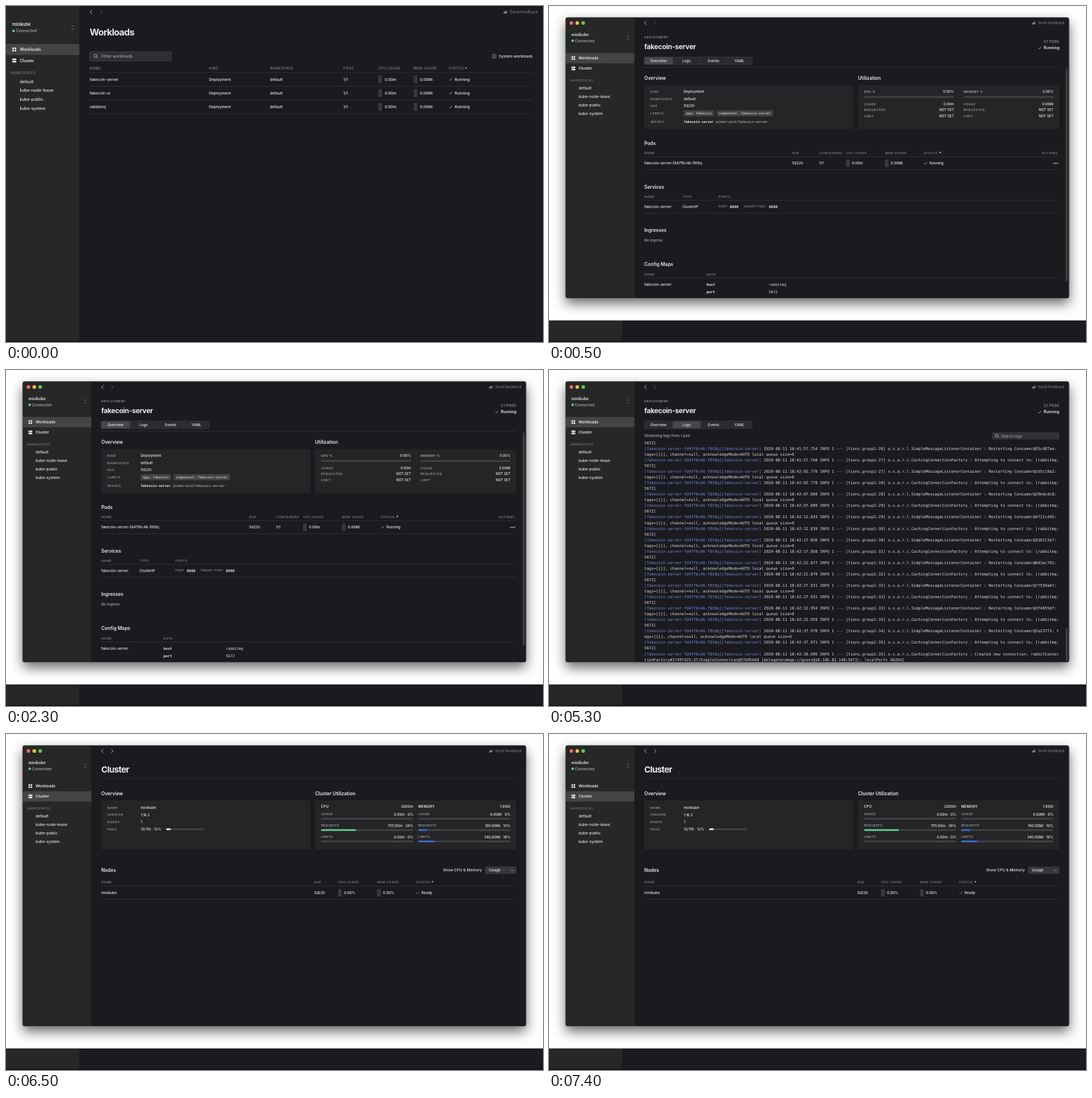
An HTML page for the animation above (8 s loop, 947 by 592 pixels).

```html
<!DOCTYPE html>
<html lang="en">
<head>
<meta charset="utf-8">
<title>Cluster dashboard</title>
<style>
  html, body { margin: 0; width: 100%; height: 100%; overflow: hidden; background: #1b1a1e; }
  svg { display: block; width: 947px; height: 592px; }
  text { font-family: Inter, Roboto, sans-serif; white-space: pre; }
  .mono { font-family: "DejaVu Sans Mono", "Liberation Mono", monospace; }
</style>
</head>
<body>
<svg id="stage" viewBox="0 0 947 592"></svg>
<script>
const WHITE = '#e9e9ea', SOFT = '#c9c9cb', GRAY = '#8b8b8e', DIM = '#626266';
const LINE = '#343438', PANEL = '#252528', TRACK = '#434347', GREEN = '#5fcb8b', BLUE = '#336fd4';
const RIGHT = 900, LEFT = 168;

// y is the middle of the capital letters
const text = (x, y, str, { size = 6.3, weight = 500, fill = WHITE, gap = 0, anchor = 'start', mono = false } = {}) =>
  `<text x="${x}" y="${(y + size * .36).toFixed(2)}" font-size="${size}" font-weight="${weight}" fill="${fill}"` +
  ` letter-spacing="${gap}" text-anchor="${anchor}"${mono ? ' class="mono"' : ''}>${str.replace(/&/g, '&amp;')}</text>`;
const end = (x, y, str, style = {}) => text(x, y, str, { ...style, anchor: 'end' });
const mid = (x, y, str, style = {}) => text(x, y, str, { ...style, anchor: 'middle' });
const mono = (x, y, str, style = {}) => text(x, y, str, { size: 5.85, weight: 400, ...style, mono: true });
const label = (x, y, str, style = {}) => text(x, y, str, { size: 5.45, fill: GRAY, gap: .6, ...style });
const heading = (x, y, str) => text(x, y, str, { size: 8.3, weight: 600 });
const rect = (x, y, w, h, fill, r = 0, extra = '') =>
  `<rect x="${x}" y="${y}" width="${w}" height="${h}" rx="${r}" fill="${fill}" ${extra}/>`;
const dot = (x, y, r, fill) => `<circle cx="${x}" cy="${y}" r="${r}" fill="${fill}"/>`;
const stroke = (d, color, width = 1) => `<path d="${d}" fill="none" stroke="${color}" stroke-width="${width}"/>`;
const rule = (y, x1 = LEFT, x2 = RIGHT) => stroke(`M${x1} ${y}H${x2}`, LINE, .9);
const check = (x, y, color = SOFT) => stroke(`M${x - 2.4} ${y + .3}l1.6 1.7 3.4 -4`, color, .8);
const caret = (x, y) => `<path d="M${x - 1.7} ${y - 1.4}h3.4l-1.7 2.8z" fill="${SOFT}"/>`;
const lens = (x, y) => stroke(`M${x + 1.4} ${y + 1.4}l2.4 2.4`, SOFT, .9) +
  `<circle cx="${x - .5}" cy="${y - .5}" r="2.6" fill="none" stroke="${SOFT}" stroke-width=".9"/>`;
const gauge = (x, y, h = 13) => rect(x, y - h / 2, 6.3, h, '#39393c', .6);
const bar = (x, y, w, value = 0, color = GREEN) =>
  rect(x, y - 1.5, w, 3, TRACK, 1.5) + (value ? rect(x, y - 1.5, value, 3, color, 1.5) : '');
const headers = (y, cols, style) => cols.map(([x, str]) => label(x, y, str, style)).join('');

function chrome(active, forward = DIM) {
  const item = { size: 7.2 };
  const strong = { size: 7.2, weight: 600 };
  const tiles = [[11, 73], [15, 73], [11, 77], [15, 77]].map(([x, y]) => rect(x, y, 3, 3, WHITE, .5)).join('');
  const names = ['default', 'kube-node-lease', 'kube-public', 'kube-system'];
  return rect(0, 0, 947, 592, '#1b1a1e') + rect(0, 0, 129.3, 592, '#262727') +
    rect(0, active ? 86.2 : 67, 129.3, 19.3, '#434446') +
    text(11, 32.6, 'minikube', { size: 7.35, weight: 600 }) +
    dot(13.3, 43.9, 2.4, GREEN) + text(17.5, 43.9, 'Connected', { size: 7, fill: '#b2b2b4' }) +
    stroke('M115.6 36.4l2.3-2.4 2.3 2.4M115.6 39.4l2.3 2.4 2.3-2.4', GRAY, .8) +
    tiles + text(24.5, 76.6, 'Workloads', strong) +
    rect(10.8, 92.4, 7.4, 3, WHITE, .6) + rect(10.8, 96.4, 7.4, 3, WHITE, .6) +
    dot(12.3, 93.9, .6, '#333') + dot(12.3, 97.9, .6, '#333') +
    text(24.5, 96, 'Cluster', strong) +
    label(8.8, 118.4, 'NAMESPACES', { size: 5.6, gap: .5, fill: '#7b7b7e' }) +
    names.map((name, i) => text(24.5, 133 + i * 15.8, name, item)).join('') +
    stroke('M152 7l-3.6 3.6 3.6 3.6', SOFT) + stroke('M166.6 7l3.6 3.6-3.6 3.6', forward) +
    `<path d="M877 11.5l5-3.5v5.4l-3-.6-.6 1.2-.8-.2.1-1.4zM882.8 8.4l1 -.4v5.4l-1-.3z" fill="${GRAY}"/>` +
    text(888.5, 10.6, 'Send feedback', { size: 6.9, fill: '#77777a' });
}

function workloads() {
  const cell = { size: 6.7 };
  const row = (name, i) => {
    const y = 129.2 + i * 24.3;
    return text(147.5, y, name, cell) + text(358, y, 'Deployment', cell) + text(465.5, y, 'default', cell) +
      text(595, y, '1/1', cell) + gauge(656.7, y, 13.6) + text(668, y, '0.00m', cell) +
      gauge(719, y, 13.6) + text(730, y, '0.00Mi', cell) +
      check(784, y) + text(791.3, y, 'Running', { size: 6.8 }) + rule(y + 12.1, 147.5, 928);
  };
  return chrome(0) +
    text(147.5, 45.8, 'Workloads', { size: 16.2, weight: 700, gap: -.75 }) +
    rect(147.4, 80.4, 144.4, 16.6, '#303033', 1.5, 'stroke="#434347" stroke-width=".7"') +
    lens(158, 88.2) + text(169, 88.7, 'Filter workloads', { size: 7.25, weight: 400, fill: '#b4b4b7' }) +
    rect(857.4, 85.1, 6.8, 6.8, '#3a3a3d', 1, 'stroke="#85858a" stroke-width=".8"') +
    text(869, 88.7, 'System workloads', { size: 6.8 }) +
    headers(110.4, [[147.5, 'NAME'], [358, 'KIND'], [465.5, 'NAMESPACE'], [595, 'PODS'],
      [656.7, 'CPU USAGE'], [719, 'MEM USAGE'], [781, 'STATUS']], { size: 5.8, gap: .64 }) +
    caret(811.2, 109.6) + rule(117.1, 147.5, 928) +
    ['fakecoin-server', 'fakecoin-ui', 'rabbitmq'].map(row).join('') +
    rect(0, 590.3, 947, 1.7, '#150e14');
}

function appWindow(active, content, forward) {
  const lights = ['#ef6a5e', '#e5bf3c', '#62c554'].map((c, i) => dot(39.5 + i * 10.4, 29.9, 3.2, c)).join('');
  return rect(0, 0, 947, 554, '#fff') + rect(29.3, 20, 888, 495, '#1b1a1e', 4, 'filter="url(#shadow)"') +
    `<g clip-path="url(#frame)"><g transform="translate(29.3 20) scale(.9377)">${chrome(active, forward)}</g>` +
    `${lights}${content}</g>` +
    rect(29.3, 20.2, 887.6, 494.6, 'none', 4, 'stroke="#58585b" stroke-width=".8"');
}

function deploymentHead(active) {
  const edges = [168, 218.3, 267.2, 313.6, 358.2];
  return label(LEFT, 54.8, 'DEPLOYMENT', { fill: '#a2a2a5' }) +
    text(LEFT, 71.8, 'fakecoin-server', { size: 12.2, weight: 700, gap: -.3 }) +
    end(RIGHT, 62.6, '1/1 PODS', { size: 6, fill: '#a2a2a5', gap: .3 }) +
    check(865.5, 74) + end(RIGHT, 74, 'Running', { size: 6.9, weight: 600 }) +
    rect(168, 90, 190.2, 13, '#2b2b2e', 1.6) +
    rect(edges[active], 90, edges[active + 1] - edges[active], 13, '#47474a', 1.6) +
    rect(168, 90, 190.2, 13, 'none', 1.6, 'stroke="#48484b" stroke-width=".6"') +
    edges.slice(1, 4).map(x => stroke(`M${x} 90v13`, '#404043', .6)).join('') +
    ['Overview', 'Logs', 'Events', 'YAML'].map((name, i) =>
      mid([193, 242.6, 290.3, 335.7][i], 96.6, name)).join('');
}

const panels = (y, h) => rect(LEFT, y, 369, h, PANEL, 1.5) + rect(544.7, y, 355.3, h, PANEL, 1.5);

function overview() {
  const fields = [['KIND', 151], ['NAMESPACE', 163.6], ['AGE', 176.2], ['LABELS', 189], ['IMAGES', 204.3]];
  const usage = (x, name, amount, w = 158.6) =>
    label(x, 150.6, name, { fill: SOFT, gap: .4 }) + end(x + w, 150.6, '0.00%', { size: 6 }) + bar(x, 160.2, w) +
    [['USAGE', amount], ['REQUESTED', 'NOT SET'], ['LIMIT', 'NOT SET']].map(([key, value], i) =>
      label(x, 172.7 + i * 10.5, key, { fill: '#a8a8ab' }) + end(x + w, 172.7 + i * 10.5, value, { size: 6 })).join('');
  const code = { size: 6.3 }, bold = { size: 6.3, weight: 700 };
  return deploymentHead(0) + rule(107.8) +
    heading(LEFT, 127.3, 'Overview') + heading(545, 127.3, 'Utilization') + panels(139.8, 77) +
    fields.map(([key, y]) => label(178.5, y, key, { fill: '#a2a2a5' })).join('') +
    text(237.5, 151, 'Deployment') + text(237.5, 163.6, 'default') + text(237.5, 176.2, '5d22h') +
    rect(237.5, 183.8, 53.7, 10.5, '#434347', 1.5) + mono(241.4, 189, 'app: fakecoin') +
    rect(295.6, 183.8, 99.6, 10.5, '#434347', 1.5) + mono(299.5, 189, 'component: fakecoin-server') +
    mono(237.5, 204.3, 'fakecoin-server', { weight: 700 }) +
    mono(294.2, 204.3, 'pimdorvald/fakecoin-server', { fill: SOFT }) +
    usage(555.6, 'CPU %', '0.00m') + usage(731, 'MEMORY %', '0.00Mi') +

    heading(LEFT, 242.5, 'Pods') +
    headers(259.2, [[LEFT, 'NAME'], [428.7, 'AGE'], [476.3, 'CONTAINERS'], [524, 'CPU USAGE'],
      [592.4, 'MEM USAGE'], [661, 'STATUS']]) + caret(690, 258.5) +
    label(897.2, 259.2, 'ACTIONS', { anchor: 'end' }) + rule(265.7) +
    text(LEFT, 277, 'fakecoin-server-fd47f6c46-f8t8q') + text(428.7, 277, '5d22h') + text(476.3, 277, '1/1') +
    gauge(524, 277) + text(534.3, 277, '0.00m') + gauge(592.4, 277) + text(602.8, 277, '0.00Mi') +
    check(664, 277) + text(671, 277, 'Running') +
    [890.3, 893.5, 896.7].map(x => dot(x, 277.3, 1, WHITE)).join('') + rule(288.4) +

    heading(LEFT, 318.6, 'Services') +
    headers(335.8, [[LEFT, 'NAME'], [235.5, 'TYPE'], [298.8, 'PORTS']]) + rule(342.3) +
    text(LEFT, 353.5, 'fakecoin-server') + text(235.5, 353.5, 'ClusterIP') +
    label(298.8, 353.5, 'PORT', { gap: .3 }) + mono(318.8, 353.5, '8080', bold) +
    label(342.8, 353.5, 'TARGET PORT', { gap: .3 }) + mono(387.8, 353.5, '8080', bold) + rule(364.9) +

    heading(LEFT, 395, 'Ingresses') + text(LEFT, 412.3, 'No Ingress', { fill: '#aaaaad' }) +
    heading(LEFT, 455.3, 'Config Maps') +
    headers(472.6, [[LEFT, 'NAME'], [277.7, 'DATA']]) + rule(479) +
    text(LEFT, 490.5, 'fakecoin-server') +
    mono(277.7, 490.5, 'host', bold) + mono(387.8, 490.5, 'rabbitmq', code) +
    mono(277.7, 504.2, 'port', bold) + mono(387.8, 504.2, '5672', code) +
    rect(911, 110, 4, 375, '#3c3c3f', 2);
}

function logs() {
  const wrapAt = 177, source = '[fakecoin-server-fd47f6c46-f8t8q][fakecoin-server]';
  const times = ('41:57.754 41:57.760 42:02.776 42:02.778 42:07.808 42:07.809 42:12.834 42:12.839 42:17.856 42:17.858 ' +
    '42:22.877 42:22.879 42:27.921 42:27.931 42:32.954 42:32.959 42:37.970 42:37.971 42:38.095').split(' ');
  const consumers = '55c487ae 1d5c19a2 19edcdc8 4711cd45 330111b7 643ac781 77559abf 3f4855df 5a23773'.split(' ');
  const message = i => {
    if (i === times.length - 1) return 'c.CachingConnectionFactory : Created new connection: ' +
      'rabbitConnectionFactory#17497425:37/SimpleConnection@57b95640 ' +
      '[delegate=amqp://guest@10.106.82.148:5672/, localPort= 40264]';
    return i % 2 ? 'c.CachingConnectionFactory : Attempting to connect to: [rabbitmq:5672]' :
      `l.SimpleMessageListenerContainer : Restarting Consumer@${consumers[i / 2]}: ` +
      'tags=[{}], channel=null, acknowledgeMode=AUTO local queue size=0';
  };
  const style = { size: 6.865, fill: '#dededf' };
  const lineY = n => 128.4 + n * 10.045;
  const entry = (time, i) => {
    const full = `${source} 2020-08-11 18:${time} INFO 1 --- [tions.group1-${26 + Math.ceil(i / 2)}] o.s.a.r.${message(i)}`;
    const y = lineY(1 + i * 2);
    return mono(LEFT, y, source, { ...style, fill: '#6f8fe8' }) +
      mono(LEFT + source.length * style.size * .602, y, full.slice(source.length, wrapAt), style) +
      mono(LEFT, lineY(2 + i * 2), full.slice(wrapAt), style);
  };
  return deploymentHead(1) +
    text(LEFT, 116, 'Streaming logs from 1 pod', { size: 6.45, fill: '#b2b2b5' }) +
    rect(781.4, 109.6, 118.6, 12.8, '#323235', 1.5) + lens(790, 115.8) +
    text(797, 116.2, 'Search logs', { size: 6.7, weight: 400, fill: '#b0b0b3' }) +
    mono(LEFT, lineY(0), '5672]', style) + times.map(entry).join('') +
    rect(911, 455, 4, 58, '#3f3f42', 2);
}

function cluster() {
  const fields = [['NAME', 'minikube'], ['VERSION', '1.16.2'], ['NODES', '1'], ['PODS', '13/110 · 12%']];
  const usage = (x, name, total, rows, color) =>
    text(x, 128, name, { size: 6, weight: 600, gap: .3 }) + end(x + 162.7, 128, total) +
    ['USAGE', 'REQUESTS', 'LIMITS'].map((key, i) => {
      const y = 141.5 + i * 20, [value, fill] = rows[i];
      return label(x, y, key, { fill: '#b0b0b3', gap: .45 }) + end(x + 162.7, y, value, { size: 6.2 }) +
        bar(x, y + 7.8, 162.7, fill, color);
    }).join('');
  return text(LEFT, 63, 'Cluster', { size: 15.2, weight: 700, gap: -.7 }) + rule(78.6) +
    heading(LEFT, 104.6, 'Overview') + heading(545, 104.6, 'Cluster Utilization') + panels(117, 86.7) +
    fields.map(([key, value], i) => label(178.5, 129.7 + i * 12.7, key, { fill: '#a2a2a5' }) +
      text(237.5, 129.7 + i * 12.7, value)).join('') +
    bar(282.5, 167.7, 67.5, 8, WHITE) +
    usage(555.6, 'CPU', '2000m', [['0.00m · 0%', 0], ['755.00m · 38%', 61.5], ['0.00m · 0%', 0]], GREEN) +
    usage(726.9, 'MEMORY', '1.89Gi', [['0.00Mi · 0%', 0], ['190.00Mi · 10%', 15.8], ['340.00Mi · 18%', 28.8]], BLUE) +
    heading(LEFT, 239.8, 'Nodes') + end(839, 239.9, 'Show CPU & Memory', { size: 6.7 }) +
    rect(844.8, 233.4, 55.2, 13.2, '#38383b', 1.6) + text(851.6, 239.9, 'Usage', { size: 6.7 }) +
    stroke('M890.8 239.3l1.9 1.9 1.9-1.9', SOFT, .8) +
    headers(261.3, [[LEFT, 'NAME'], [543.4, 'AGE'], [585.6, 'CPU USAGE'], [654.4, 'MEM USAGE'], [723, 'STATUS']]) +
    caret(752, 260.6) + rule(268) +
    text(LEFT, 279.7, 'minikube') + text(543.4, 279.7, '5d22h') +
    gauge(585.6, 279.7) + text(596, 279.7, '0.00%') + gauge(654.4, 279.7) + text(664.8, 279.7, '0.00%') +
    check(726, 279.7, GREEN) + text(732.8, 279.7, 'Ready') + rule(291.2);
}

const stage = document.getElementById('stage');
stage.innerHTML = `<defs>
  <clipPath id="frame"><rect x="29.3" y="20" width="888" height="495" rx="4"/></clipPath>
  <filter id="shadow" x="-10%" y="-10%" width="120%" height="125%">
    <feDropShadow dx="0" dy="9.5" stdDeviation="10.5" flood-color="#000" flood-opacity=".58"/>
  </filter></defs>` + workloads() +
  [appWindow(0, overview()), appWindow(0, logs()), appWindow(1, cluster(), SOFT)]
    .map(view => `<g class="view" visibility="hidden">${view}</g>`).join('');

const views = [...stage.querySelectorAll('.view')];
const starts = [500, 3500, 6500], LOOP = 8000;
function tick() {
  const time = performance.now() % LOOP;
  const current = starts.filter(start => time >= start).length - 1;
  views.forEach((view, i) => view.setAttribute('visibility', i === current ? 'visible' : 'hidden'));
  requestAnimationFrame(tick);
}
tick();
</script>
</body>
</html>
```
